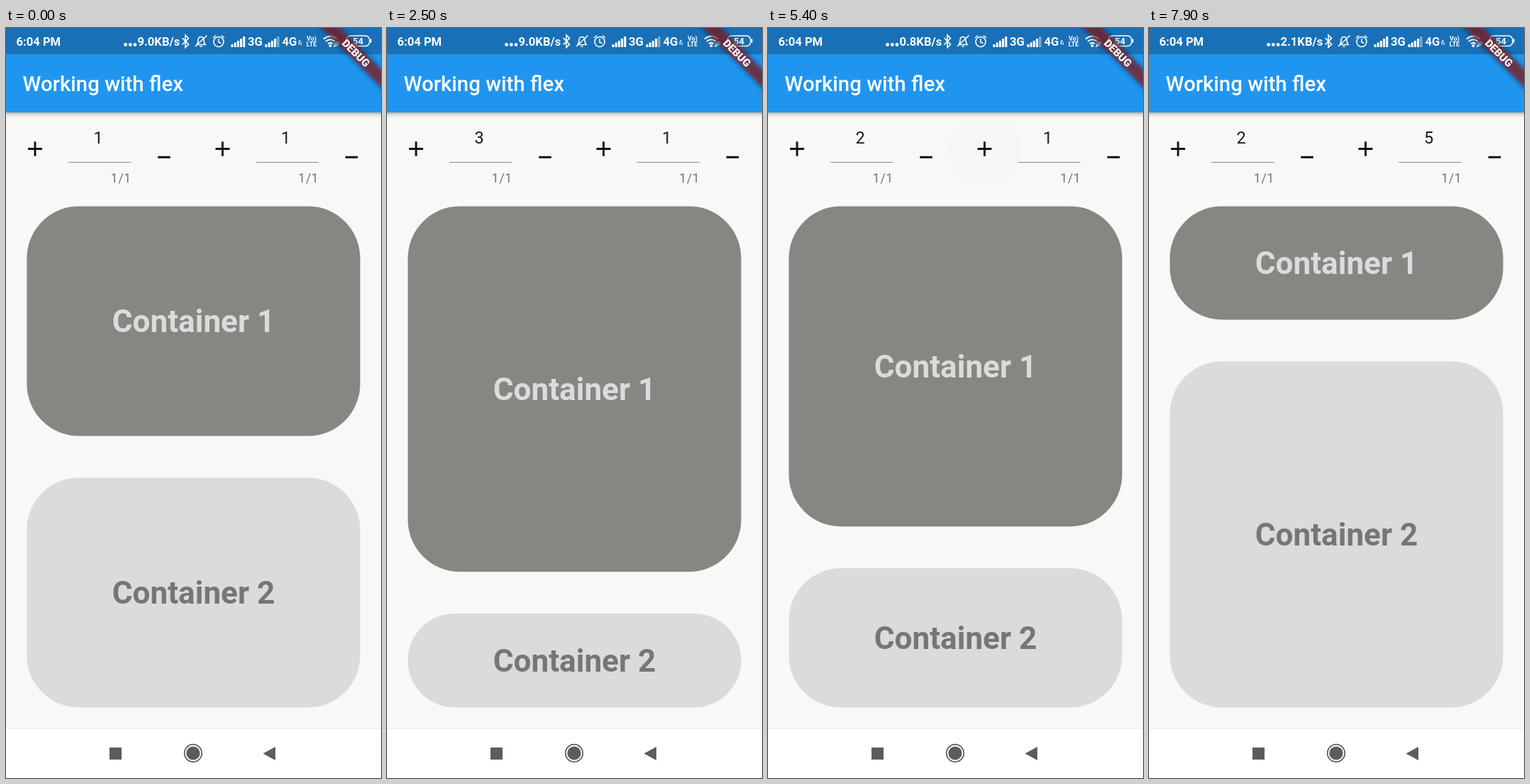
An HTML page for the animation above (8000 ms loop, 529x1058 px).

```html
<!DOCTYPE html>
<html lang="en">
<head>
<meta charset="utf-8">
<title>Working with flex</title>
<style>
  html, body { margin: 0; width: 100%; height: 100%; overflow: hidden; background: #f8f9f7; }
  svg { display: block; width: 100%; height: 100%; font-family: Roboto, sans-serif; }
  .mid { text-anchor: middle; }
  .box { font-size: 44.1px; font-weight: 700; }
  .line { fill: none; stroke: #fff; stroke-width: 1.6; }
  .status { font-size: 16.6px; font-weight: 600; fill: #fff; }
</style>
</head>
<body>
<svg viewBox="0 0 529 1058">
  <defs>
    <linearGradient id="shade" x2="0" y2="1">
      <stop offset="0" stop-opacity=".3"/>
      <stop offset=".4" stop-opacity=".1"/>
      <stop offset="1" stop-opacity="0"/>
    </linearGradient>
    <filter id="blur" x="-20%" y="-60%" width="140%" height="220%"><feGaussianBlur stdDeviation="4"/></filter>
    <g id="bars">
      <path d="M0 27h3v-4h-3zM4.2 27h3v-6.500h-3zM8.400 27h3v-9h-3zM12.600 27h3v-12h-3z" fill="#fff"/>
      <path d="M16.800 27h3v-15h-3z" fill="#fff" class="last"/>
    </g>
    <g id="counter">
      <path d="M31 170.500H51M41 160.200V180.800M214.200 182.200H231.800" stroke="#111" stroke-width="2.9"/>
      <path d="M88 189.500H176.400" stroke="#8b8c8a"/>
      <text x="147.800" y="217.800" font-size="17.600" letter-spacing=".7" fill="#727371">1/1</text>
    </g>
  </defs>

  <rect width="529" height="1058" fill="#f8f9f7"/>
  <g id="ripples"></g>
  <rect y="119" width="529" height="8" fill="url(#shade)"/>
  <rect width="529" height="119" fill="#2095f0"/>
  <rect width="529" height="37" fill="#1970b6"/>
  <text x="23.500" y="88.500" font-size="29.400" font-weight="500" fill="#fff">Working with flex</text>

  <!-- status bar -->
  <g class="status">
    <text x="14.500" y="25">6:04 PM</text>
    <circle cx="168.600" cy="23.500" r="2.4"/><circle cx="175.300" cy="23.500" r="2.4"/><circle cx="182" cy="23.500" r="2.4"/>
    <text id="speed" x="185.500" y="25"></text>
    <text x="341" y="25">3G</text>
    <text x="389.500" y="25">4G</text>
    <text x="431" y="17.500" class="mid" font-size="9">Vo)</text>
    <text x="431" y="26" class="mid" font-size="9">LTE</text>
    <text x="496.500" y="23" class="mid" font-size="13">54</text>
    <path d="M413 19l1.500-2.500 1.500 2.500zM412.800 18.500h1.200v5h-1.200zM415.500 20h1.200v4h-1.200z"/>
    <rect x="513.500" y="15.500" width="2" height="5"/>
    <circle cx="457.500" cy="25" r="2"/>
  </g>
  <g class="line">
    <path d="M248.500 14L257.500 23 253 27.500V10L257.500 14.500 248.500 23.500"/>
    <path d="M269 23.500H281Q279 21 279 17.500Q279 12.500 275 12.500Q271 12.500 271 17.500Q271 21 269 23.500M273.500 26H276.500M267 26L283.500 10.500"/>
    <circle cx="300" cy="19.500" r="7"/>
    <path d="M300 15V20L303.500 21.500M292 14L296 10.500M304 10.500L308 14"/>
    <path d="M448 15.500Q457.500 7.500 467 15.500M451 19Q457.500 13.500 464 19M454 22.200Q457.500 19.500 461 22.200" stroke-width="2"/>
    <path d="M463 26L464 23L468 19L470 21L466 25Z" stroke-width="1.200"/>
    <rect x="480" y="11" width="33" height="14.500" rx="6"/>
  </g>
  <use href="#bars" x="317.500"/>
  <use href="#bars" x="365.500"/>
  <path d="M382.300 27h3v-15h-3z" fill="#1970b6" opacity=".6"/>

  <!-- corner ribbon -->
  <g transform="translate(529) rotate(45)">
    <rect x="-80" y="41.100" width="160" height="17.700" opacity=".5" filter="url(#blur)"/>
    <rect x="-80" y="41.100" width="160" height="17.700" fill="#b71c1c" fill-opacity=".5"/>
    <text y="55.300" class="mid" font-size="15" font-weight="900" fill="#fff">DEBUG</text>
  </g>

  <!-- flex controls -->
  <use href="#counter"/>
  <use href="#counter" x="264.500"/>
  <g class="mid" font-size="23.500" fill="#1b1c1b">
    <text id="value1" x="130" y="163"></text>
    <text id="value2" x="394.500" y="163"></text>
  </g>

  <rect id="box1" x="29.400" width="470.200" fill="#858783"/>
  <rect id="box2" x="29.400" width="470.200" fill="#dadcd9"/>
  <text id="label1" x="264.500" class="mid box" fill="#dadcd9">Container 1</text>
  <text id="label2" x="264.500" class="mid box" fill="#757773">Container 2</text>

  <!-- navigation bar -->
  <rect y="988" width="529" height="70" fill="#fefffe"/>
  <path d="M0 988H529" stroke="#e6e7e5"/>
  <g fill="#5b5c5b">
    <rect x="146" y="1015" width="17" height="17"/>
    <circle cx="264" cy="1023" r="9.600"/>
    <circle cx="264" cy="1023" r="12.300" fill="none" stroke="#5b5c5b" stroke-width="1.700"/>
    <path d="M362.500 1023.500L380 1014V1033Z"/>
  </g>
</svg>

<script>
const LOOP = 8000, TOP = 222, BOTTOM = 988, MARGIN = 29.4, RADIUS = 73.5;
const get = id => document.getElementById(id);

// time of the tap, which counter, step
const taps = [
  [1630, 0, 1], [2300, 0, 1], [3150, 0, 1], [3900, 0, -1], [4750, 0, -1],
  [5530, 1, 1], [5960, 1, 1], [6500, 1, 1], [7700, 1, 1]
];
const speeds = [[0, '9.0'], [3400, '0.8'], [7300, '2.1']];

const ripples = taps.map(([, side, step]) => {
  const c = document.createElementNS('http://www.w3.org/2000/svg', 'circle');
  c.setAttribute('cx', 41 + side * 264.5 + (step < 0 ? 182 : 0));
  c.setAttribute('cy', 170.5);
  c.setAttribute('r', 51.4);
  return get('ripples').appendChild(c);
});

function placeBox(n, top, bottom) {
  const y = top + MARGIN, height = bottom - top - 2 * MARGIN;
  const box = get('box' + n);
  box.setAttribute('y', y);
  box.setAttribute('height', height);
  box.setAttribute('rx', Math.min(RADIUS, height / 2));
  get('label' + n).setAttribute('y', y + height / 2 + 15.6);
}

function rippleAlpha(dt) {
  const a = dt < 0 ? 1 + dt / 150 : dt < 60 ? 1 : 1 - (dt - 60) / 140;
  return 0.045 * Math.max(0, a);
}

function draw(t) {
  const flex = [1, 1];
  taps.forEach(([at, side, step], i) => {
    if (t >= at) flex[side] += step;
    ripples[i].setAttribute('opacity', rippleAlpha(t - at));
  });
  const split = TOP + (BOTTOM - TOP) * flex[0] / (flex[0] + flex[1]);
  placeBox(1, TOP, split);
  placeBox(2, split, BOTTOM);
  get('value1').textContent = flex[0];
  get('value2').textContent = flex[1];
  get('speed').textContent = speeds.filter(s => t >= s[0]).pop()[1] + 'KB/s';
}

function tick() {
  draw(performance.now() % LOOP);
  requestAnimationFrame(tick);
}
tick();
</script>
</body>
</html>
```
